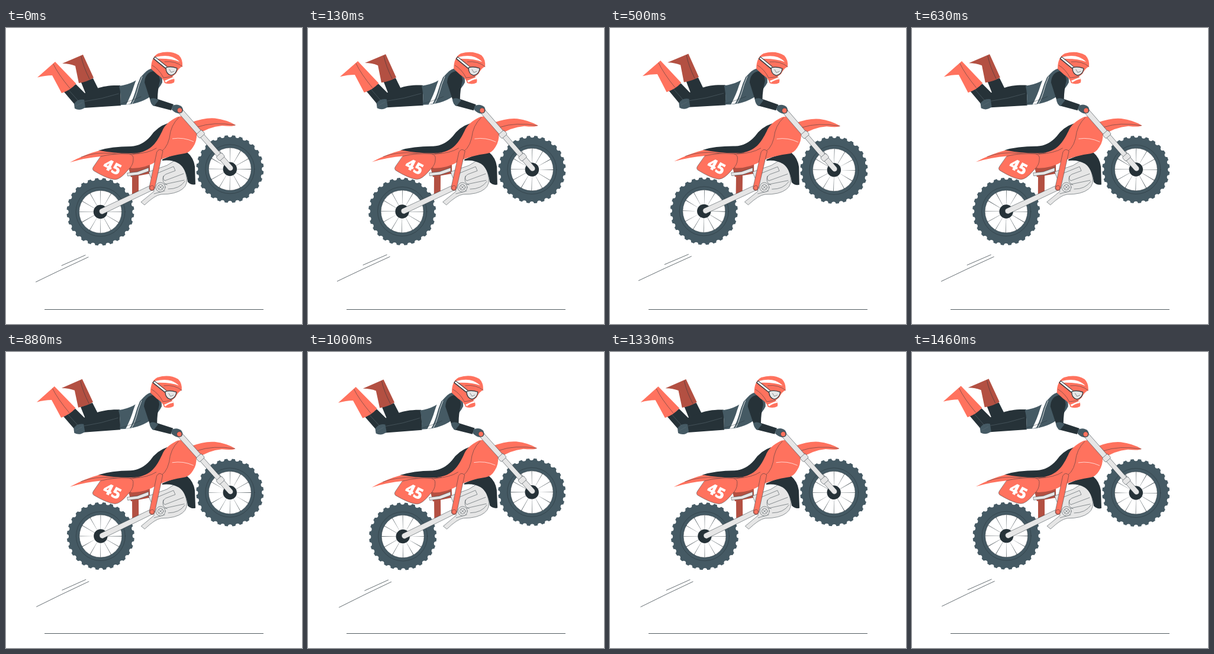
Write an HTML page that moves like this. It is 500 px wide and 500 px high and loops after 1500 ms.

```html
<!DOCTYPE html>
<html lang="en">
<head>
<meta charset="utf-8">
<title>Motocross jump</title>
<style>
  html, body { margin: 0; width: 100%; height: 100%; overflow: hidden; background: #fff; }
  svg { display: block; width: 100%; height: 100%; }
  .coral { fill: #ff725e; }
  .brick { fill: #b35042; }
  .dark { fill: #263238; }
  .slate { fill: #455a64; }
  .light { fill: #e6e6e6; }
  .white { fill: #fff; }
  .line { fill: none; }
  .edge, .line { stroke: #263238; stroke-width: .5; stroke-linecap: round; stroke-linejoin: round; }
  text { font: 800 26px "Open Sans", sans-serif; text-anchor: middle; }
</style>
</head>
<body>
<svg viewBox="0 0 500 500">
  <defs>
    <g id="wheel">
      <circle class="slate" r="57"/>
      <circle class="line" r="57.5" pathLength="280" style="stroke:#fff;stroke-width:7.4" stroke-dasharray="0 10"/>
      <circle class="line" r="41.5"/>
      <circle class="white edge" r="36"/>
      <circle class="line" r="23.5" pathLength="120" style="stroke-width:25;stroke-linecap:butt" stroke-dasharray=".34 9.66"/>
      <circle class="dark" r="11.7"/>
    </g>
  </defs>

  <path class="line" d="M65.500 475.500 H434.500" style="stroke-width:.8"/>

  <g id="jump">
    <!-- speed streaks -->
    <path class="line" d="M50.500 429 L94 408 L139 387 M94 401.300 L134 383.700" style="stroke-width:.7"/>

    <use href="#wheel" x="159.5" y="310.5"/>
    <use href="#wheel" x="378.3" y="238.3"/>

    <!-- frame and engine -->
    <path class="brick" d="M213 248 L224 247 V278 L213 283Z M207 236 L243 230 V246 L211 252Z"/>
    <path class="light edge" d="M205 245 L222 243 L241 236 L241 242 L224 248 L206 250Z"/>
    <path class="light edge" d="M241 243 L272 232 L288 222 Q301 232 304 247 Q309 264 298 272 Q287 281 262 281 Q252 282 234 299 L228 294 L250 276 L247 258Z"/>
    <path class="line" d="M254 246 L283 234 L286 241 L270 247 Q262 252 268 258 L300 246 M268 264 L301 257 M266 250 Q262 262 272 265 M274 272 Q293 272 302 259 M250 280 L268 275"/>
    <circle class="light edge" cx="261" cy="269" r="8"/>
    <circle class="line" cx="261" cy="269" r="4.7"/>
    <path class="line" d="M258 266 L264 272 M264 266 L258 272"/>
    <path class="dark" d="M264 222 Q288 211 306 210 Q317 219 319 234 L320 264 Q313 266 307 260 Q304 237 292 229 Q280 222 264 224Z"/>
    <path class="light edge" d="M159 306 L244 266 Q249 266 249 273 L163 314.500 A5 5 0 0 1 159 306Z"/>

    <!-- bodywork -->
    <path class="coral" d="M312 160 Q335 151 353 152.500 Q373 155 388 164 Q384 167 365 165 Q342 167 322 181Z"/>
    <path class="line" d="M324 167 Q350 158 387 164"/>
    <path class="dark" d="M156 207 Q178 200 211 200 Q230 199 244 183 Q255 167 273 161 L270 207 L200 216Z"/>
    <path class="coral" d="M108 227 Q134 213 158 207 Q190 213 218 211.500 C246 209 255 192 264 174 Q269 160 290 150 L296 149 L322 177 Q323 191 316 201 Q310 211 301 212 Q278 215 257 224 Q236 237 213 237 L160 217 Q135 219 108 227Z"/>
    <path class="line" d="M292 151 Q278 164 276 186 Q271 207 256 212 M214 213 Q240 212 254 203 M127 218 Q151 209 180 212 Q206 216 226 211"/>
    <path d="M281 187 Q300 184 317 192" fill="none" stroke="#fff" stroke-width=".7"/>
    <path class="coral edge" d="M160 217 Q184 211 208 213 Q216 214 215 222 Q215 232 206 240 Q193 256 184 256 Q171 255 148 241 Q145 238 148 234Z"/>
    <text class="white" transform="translate(180 234.500) rotate(27)" y="9.300">45</text>
    <path class="coral edge" d="M255 209 Q259 202 265 208 L251 271 A4.600 4.600 0 0 1 242 269Z"/>
    <circle class="coral edge" cx="246.500" cy="270" r="3.700"/>

    <!-- fork -->
    <g class="light edge" transform="translate(296 142) rotate(48.700)">
      <rect x="-3" y="-4.500" width="52" height="9"/>
      <rect x="52" y="-4" width="48" height="8"/>
      <path d="M104 -4.500 H126 A4.500 4.500 0 0 1 126 4.500 H104Z"/>
      <rect x="45" y="-6" width="9" height="12" rx="2"/>
      <rect x="96" y="-6" width="9" height="12" rx="2"/>
    </g>

    <!-- far leg -->
    <path class="dark" d="M127 92 L147 85 L157 105 L135 112Z"/>
    <path class="brick" d="M95 60 L130 45 L148 84 Q137 91 123 93 L117 64 Q107 60 95 60Z"/>
    <path class="line" d="M127 48 Q130 64 141 86"/>

    <!-- near leg -->
    <path class="dark" d="M98 108 L118 95 L133 110 C150 105 158 96 193 97 L194 131 L132 135 L115 128Z"/>
    <path class="slate" d="M115 128 Q121 119 132 121 L134 134 Q125 141 116 136Z"/>
    <path class="line" style="stroke:#607078" d="M133 124 Q162 120 190 111 M118 132 L129 126 M106 105 L122 123"/>
    <path class="coral" d="M53 83.500 L83 57 L118.500 94 Q109 105 94 110 L78 80 Q66 80 53 83.500Z"/>
    <path class="line" d="M80 61 Q88 78 108 102"/>

    <!-- torso -->
    <path class="slate" d="M191 98 Q219 94 233 77 Q241 68 250 68 Q265 76 264 92 Q260 101 245 115 Q224 130 193 130 Q195 113 191 98Z"/>
    <path class="white" d="M220 87 L228 81 Q222 94 218 109 Q214 121 210 128 L203 129.500 Q212 112 216 98Z"/>
    <path d="M230 82 Q224 96 221 109 Q218 120 213 128" fill="none" stroke="#fff" stroke-width=".8"/>
    <path class="line" d="M193 128 Q209 124 228 116"/>

    <!-- arm -->
    <path class="dark" d="M234 92 Q235 76 248 73 Q259 75 260 89 Q256 105 256 120 L283 129 L279 139 L248 131 L243 120Z"/>
    <path class="slate" d="M243 120 Q250 116 258 122 L250 132 Q244 129 243 120Z"/>
    <path class="slate" d="M281 131 Q290 127 297 133 Q301 139 297 143 Q289 147 280 138Z"/>
    <circle class="coral edge" cx="293.500" cy="139" r="4.200"/>

    <!-- helmet -->
    <path class="coral" d="M245 69 Q245 49 257 43 Q277 37 292 46 Q299 53 298 65 Q292 67 287 77 L281 82 Q286 86 284 92 Q277 96 268 93 Q266 85 256 79Z"/>
    <path class="white" d="M253 49 Q270 45 281 49 Q290 53 293 57 Q279 51 253 52Z"/>
    <path class="line" d="M247 63 Q259 70 266 84 L281 82 M268 57 Q286 55 298 65"/>
    <path d="M250 50 L271 67" stroke="#263238" stroke-width="5"/>
    <path d="M251 50.500 L272 67.500" stroke="#fff" stroke-width="2.800"/>
    <path class="light edge" d="M270 67 Q278 64 289 68 Q288 78 279 80 Q270 78 270 67Z" style="stroke-width:1.200"/>
    <path class="line" d="M276 70 L279 75 L284 73"/>
    <path class="white" d="M268 89 L282 83 L284 86 Q276 87 270 92Z"/>
  </g>
</svg>
<script>
  const PERIOD = 1500;
  const jump = document.getElementById('jump');

  // Triangle wave between +1 and -1 degree, starting at zero.
  function render() {
    const phase = (performance.now() / PERIOD + .25) % 1;
    const angle = 1 - 4 * Math.abs(phase - .5);
    jump.setAttribute('transform', `rotate(${angle} 250 250)`);
    requestAnimationFrame(render);
  }
  render();
</script>
</body>
</html>
```
